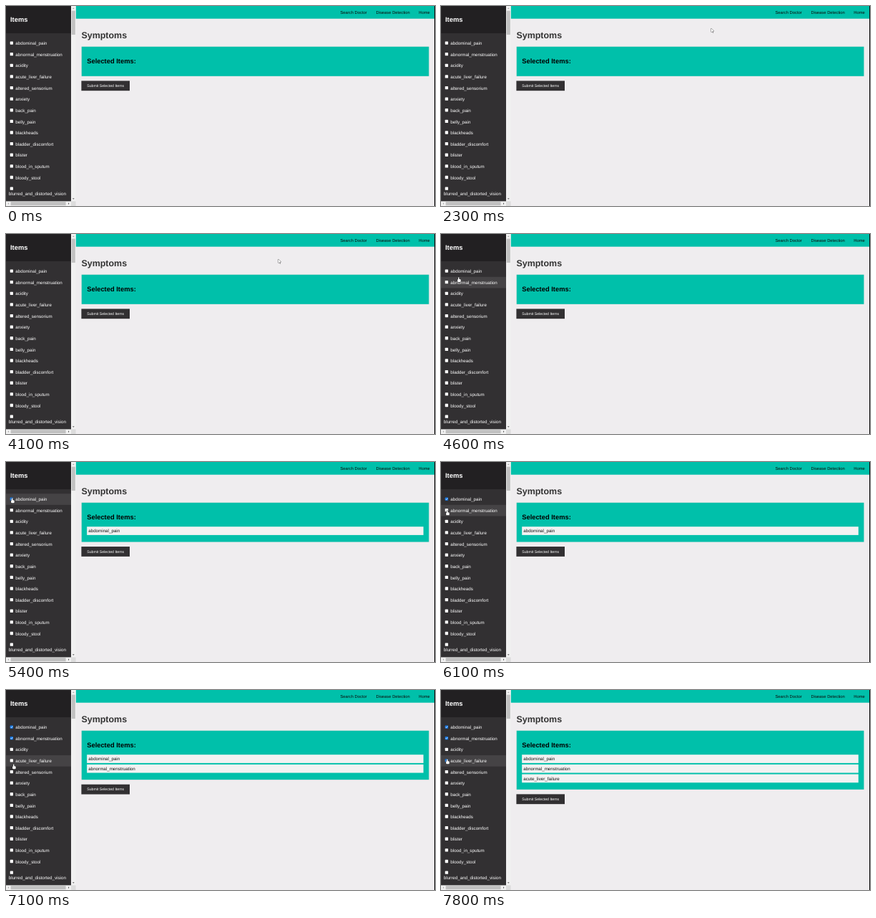
Recreate the animation shown at these times as an HTML page with a canvas. Size 600x279 px, loop 8000 ms.

```html
<!DOCTYPE html>
<html lang="en">
<head>
<meta charset="utf-8">
<title>Symptoms</title>
<style>
  html, body { margin: 0; width: 100%; height: 100%; overflow: hidden; background: #efedef; }
  canvas { display: block; width: 600px; height: 279px; }
</style>
</head>
<body>
<canvas id="stage"></canvas>
<script>
const W = 600, H = 279, LOOP = 8000, STEP = 100, MOVE = 400;
const canvas = document.getElementById('stage');
const ctx = canvas.getContext('2d');
const dpr = window.devicePixelRatio || 1;
canvas.width = W * dpr;
canvas.height = H * dpr;

// The page is laid out in CSS pixels and shown zoomed out.
const ZOOM = 0.39;
const H1 = 32 * ZOOM, H2 = 24 * ZOOM, BODY = 16 * ZOOM, NAV = 15 * ZOOM, BUTTON = 13.33 * ZOOM;
const BAR = 17 * ZOOM, BORDER = ZOOM, ITEM_H = 35 * ZOOM;
const SIDE_W = 91, SIDE_H = H - BAR, NAV_H = 17.7, ROW_TOP = 44.2, ROW_H = 15.62;
const TEAL = '#00c0aa', DARK = '#323032', PAGE = '#efedef';

const symptoms = [
  'abdominal_pain', 'abnormal_menstruation', 'acidity', 'acute_liver_failure',
  'altered_sensorium', 'anxiety', 'back_pain', 'belly_pain', 'blackheads',
  'bladder_discomfort', 'blister', 'blood_in_sputum', 'bloody_stool',
  'blurred_and_distorted_vision'
];
const checks = [
  { row: 0, at: 5300 },
  { row: 1, at: 6300 },
  { row: 3, at: 7600 }
];

const rowY = row => ROW_TOP + row * ROW_H;
const clamp = v => Math.max(0, Math.min(1, v));
const easeOut = k => 1 - (1 - k) ** 3;

// Each stop is reached at its time, after a move of fixed length.
const stops = [
  { at: 2300, x: 378, y: 31 },
  { at: 3000, x: 534.6, y: 9.8 },
  { at: 4100, x: 381, y: 35 },
  { at: 4600, x: 24, y: rowY(1.03) },
  { at: 5300, x: 8, y: rowY(0.4) },
  { at: 6100, x: 8, y: rowY(1.5) },
  { at: 7000, x: 10, y: rowY(3.8) },
  { at: 7600, x: 8, y: rowY(3.35) }
];

function pointerAt(t) {
  if (t < stops[0].at) return null;
  return stops.reduce((from, to) => {
    const k = easeOut(clamp((t - to.at + MOVE) / MOVE));
    return { x: from.x + (to.x - from.x) * k, y: from.y + (to.y - from.y) * k };
  });
}

function rect(x, y, w, h, color) {
  ctx.fillStyle = color;
  ctx.fillRect(x, y, w, h);
}

function text(str, x, y, size, color, weight = 'normal') {
  ctx.font = `${weight} ${size}px "Liberation Sans", Arial, sans-serif`;
  ctx.fillStyle = color;
  ctx.fillText(str, x, y);
}

function arrowhead(x, y, angle, color) {
  ctx.save();
  ctx.translate(x, y);
  ctx.rotate(angle);
  ctx.beginPath();
  ctx.moveTo(-1.4, 0.7);
  ctx.lineTo(0, -0.7);
  ctx.lineTo(1.4, 0.7);
  ctx.fillStyle = color;
  ctx.fill();
  ctx.restore();
}

function checkbox(x, y, checked) {
  const size = 11 * ZOOM;
  ctx.beginPath();
  ctx.roundRect(x, y, size, size, 0.6);
  ctx.fillStyle = checked ? '#1479e8' : '#fff';
  ctx.fill();
  if (!checked) return;
  ctx.beginPath();
  ctx.moveTo(x + 0.7, y + 2.3);
  ctx.lineTo(x + 1.7, y + 3.3);
  ctx.lineTo(x + 3.6, y + 1.1);
  ctx.strokeStyle = '#fff';
  ctx.lineWidth = 0.8;
  ctx.stroke();
}

function drawSidebar(t, hoverRow) {
  rect(0, 0, SIDE_W, H, DARK);
  rect(0, 0, SIDE_W, 38, '#222022');
  text('Items', 6, 22.2, H2, '#fff', 'bold');
  if (hoverRow >= 0) rect(0, rowY(hoverRow), SIDE_W, ROW_H, '#454345');

  symptoms.forEach((name, row) => {
    const y = rowY(row);
    const wrapped = row === symptoms.length - 1;
    checkbox(5.7, y + 5.2, checks.some(c => c.row === row && t >= c.at));
    text(name, wrapped ? 3.8 : 13.3, y + (wrapped ? 17 : 10), BODY, '#fff');
  });
}

function drawScrollbars() {
  const mid = BAR / 2, right = SIDE_W + mid, low = SIDE_H + mid;
  rect(SIDE_W, 0, BAR, SIDE_H, '#f1f1f1');
  rect(0, SIDE_H, SIDE_W, BAR, '#f1f1f1');
  rect(SIDE_W, SIDE_H, BAR, BAR, '#dcdcdc');
  rect(SIDE_W + 0.8, BAR, BAR - 1.6, 33.4, '#c1c1c1');
  rect(BAR, SIDE_H + 0.8, 77, BAR - 1.6, '#c1c1c1');
  arrowhead(right, mid, 0, '#a3a3a3');
  arrowhead(right, SIDE_H - mid, Math.PI, '#505050');
  arrowhead(mid, low, -Math.PI / 2, '#a3a3a3');
  arrowhead(SIDE_W - mid, low, Math.PI / 2, '#505050');
}

function drawNav(hover) {
  rect(SIDE_W + BAR, 0, W, NAV_H, TEAL);
  rect(511.3, 0, 60, NAV_H, `rgba(51, 51, 51, ${0.38 * hover})`);
  text('Search Doctor', 467.4, 11.1, NAV, '#0c0c0c');
  text('Disease Detection', 517.4, 11.1, NAV, '#0c0c0c');
  text('Home', 577.2, 11.1, NAV, '#0c0c0c');
}

function drawMain(t) {
  const left = 105.4, inner = 113.2;
  const selected = checks.filter(c => t >= c.at);
  const grow = selected.length * ITEM_H;
  text('Symptoms', left, 45.2, H1, '#333', 'bold');

  rect(left, 56.4, 486.4, 41.8 + grow, '#ddd');
  rect(left + BORDER, 56.4 + BORDER, 486.4 - 2 * BORDER, 41.8 + grow - 2 * BORDER, TEAL);
  text('Selected Items:', inner, 80.2, H2, '#000', 'bold');
  selected.forEach(({ row }, i) => {
    const y = 90.2 + i * ITEM_H;
    rect(inner, y, 470.6, 11.7, '#f2f2f2');
    text(symptoms[row], inner + 2, y + 8, BODY, '#111');
  });

  rect(left, 104.4 + grow, 67.6, 13.8, DARK);
  text('Submit Selected Items', inner, 113.1 + grow, BUTTON, '#fff');
}

function drawPointer({ x, y }, hand) {
  ctx.save();
  ctx.translate(x, y);
  ctx.beginPath();
  if (hand) {
    ctx.roundRect(0, 0, 1.4, 5, 0.7);
    ctx.roundRect(-0.9, 2.7, 4.6, 4, 1.2);
  } else {
    ctx.moveTo(0, 0);
    ctx.lineTo(0, 5.4);
    ctx.lineTo(1.5, 4.3);
    ctx.lineTo(2.5, 6.3);
    ctx.lineTo(2.3, 4);
    ctx.lineTo(3.9, 3.9);
    ctx.closePath();
  }
  ctx.lineWidth = 0.8;
  ctx.strokeStyle = hand ? '#222' : '#444';
  ctx.stroke();
  ctx.fillStyle = '#fff';
  ctx.fill();
  ctx.restore();
}

function draw(t) {
  ctx.setTransform(dpr, 0, 0, dpr, 0, 0);
  ctx.textRendering = 'geometricPrecision';
  rect(0, 0, W, H, PAGE);

  const pointer = pointerAt(t);
  const overList = pointer && pointer.x < SIDE_W && pointer.y >= ROW_TOP;
  const overNav = pointer && pointer.y < NAV_H;
  const hoverRow = overList ? Math.floor((pointer.y - ROW_TOP) / ROW_H) : -1;
  const navHover = clamp((t - 3000) / 300) * clamp((4100 - t) / 300);

  drawNav(navHover);
  drawMain(t);
  drawSidebar(t, hoverRow);
  drawScrollbars();
  rect(W - 1, 0, 1, H, '#111');
  if (pointer) drawPointer(pointer, overList || overNav);
}

const start = performance.now();
function tick() {
  const t = (performance.now() - start) % LOOP;
  draw(Math.floor(t / STEP) * STEP);
  requestAnimationFrame(tick);
}
tick();
</script>
</body>
</html>
```
